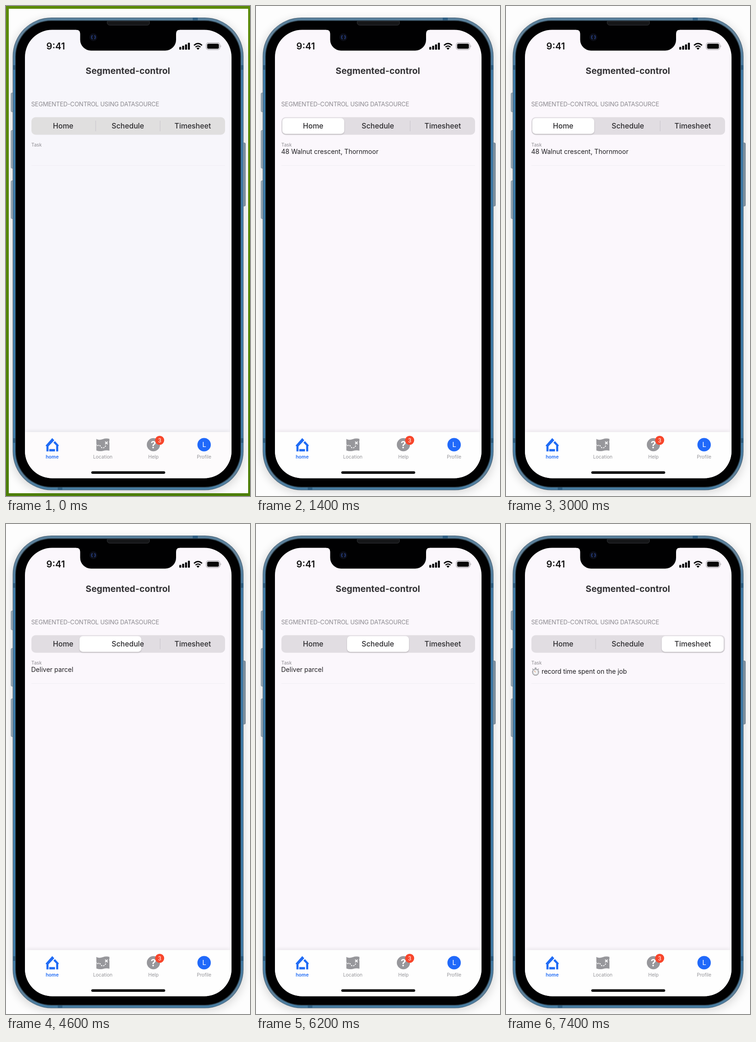
An HTML page that plays this animation: 528x1060 px, repeating every 8800 ms.

```html
<!DOCTYPE html>
<html lang="en">
<head>
<meta charset="utf-8">
<title>Segmented-control</title>
<style>
  html, body { margin: 0; width: 100%; height: 100%; overflow: hidden; background: #fdfdfd; }
  svg { display: block; width: 100vw; height: 100vh; font-family: Inter, Roboto, sans-serif;
        --screen: #fbf7fc; --track: #e1dde2; --bar: #fefefe; }
  svg.intro { --screen: #f7f6fb; --track: #e0dfdf; --bar: #fdfbfc; }
  #frame { display: none; }
  .intro #frame { display: block; }
  .mid { text-anchor: middle; }
  .seg { font-size: 15.7px; font-weight: 500; fill: #2b2a2d; }
  .tab { font-size: 10.3px; fill: #949498; }
  .task { font-size: 14px; fill: #1f1e21; }
</style>
</head>
<body>
<svg id="stage" viewBox="0 0 528 1060">
  <defs>
    <filter id="glow" x="-10%" y="-10%" width="120%" height="120%"><feGaussianBlur stdDeviation="10"/></filter>
    <filter id="soft" x="-10%" y="-40%" width="120%" height="180%"><feGaussianBlur stdDeviation="4"/></filter>
    <filter id="lift" x="-10%" y="-20%" width="120%" height="150%">
      <feDropShadow dx="0" dy="1.5" stdDeviation="1.3" flood-color="#000" flood-opacity=".22"/>
    </filter>
    <linearGradient id="green" x2="0" y2="1">
      <stop stop-color="#5b8b08"/><stop offset=".5" stop-color="#568705"/><stop offset="1" stop-color="#4c7e04"/>
    </linearGradient>
    <linearGradient id="rim" x2="0" y2="1">
      <stop stop-color="#58809c"/><stop offset=".04" stop-color="#66849a"/><stop offset=".12" stop-color="#3f7fae"/>
      <stop offset=".9" stop-color="#3f7fae"/><stop offset=".97" stop-color="#5d7f98"/><stop offset="1" stop-color="#447ca3"/>
    </linearGradient>
    <linearGradient id="key">
      <stop stop-color="#8195a5"/><stop offset=".4" stop-color="#a9bac7"/><stop offset="1" stop-color="#566a7a"/>
    </linearGradient>
    <clipPath id="display"><rect x="41" y="51.500" width="447" height="970" rx="59"/></clipPath>
  </defs>

  <rect width="528" height="1060" fill="#fdfdfd"/>
  <rect x="13" y="30" width="503" height="1022" rx="82" fill="#000" opacity=".15" filter="url(#glow)"/>
  <path id="frame" d="M0 0H528V1060H0ZM6 6V1054H524V6Z" fill="url(#green)" fill-rule="evenodd"/>

  <!-- phone body -->
  <g fill="url(#key)" stroke="#596b79" stroke-width=".7">
    <rect x="11" y="188" width="6" height="41" rx="2"/>
    <rect x="11" y="269" width="6" height="82" rx="2"/>
    <rect x="11" y="378" width="6" height="82" rx="2"/>
    <rect x="511" y="296" width="7" height="137" rx="2"/>
  </g>
  <rect x="14.5" y="25" width="499.5" height="1022.5" rx="84" fill="#526b7f"/>
  <rect x="16" y="26.3" width="496.5" height="1020" rx="82" fill="url(#rim)"/>
  <path d="M15 128h6v10h-6zM15 935h6v10h-6zM508 128h6v10h-6zM508 935h6v10h-6zM404 25h11v6h-11zM112 1041h10v6h-10z" fill="#2f5f83"/>
  <rect x="20" y="31" width="488.5" height="1010.5" rx="78" fill="#273742"/>
  <rect x="21.5" y="32.5" width="485.5" height="1007.5" rx="77" fill="#010102"/>
  <path d="M219 33H310.5V37Q310 41.5 305 41.5H225Q220 41.5 219 37Z" fill="#151618" stroke="#3b3d40" stroke-width=".8"/>

  <!-- display -->
  <g clip-path="url(#display)">
    <rect x="41" y="51" width="447" height="971" style="fill:var(--screen)"/>
    <rect x="44" y="920" width="441" height="20" fill="#000" opacity=".09" filter="url(#soft)"/>
    <rect x="41" y="921.5" width="447" height="101" style="fill:var(--bar)"/>
  </g>
  <path d="M152 50V51.5Q160.500 51.500 160.500 60V73A23.500 23.500 0 0 0 184 96.500H344.500A23.500 23.500 0 0 0 368 73V60Q368 51.500 376 51.500V50Z" fill="#010102"/>
  <circle cx="189" cy="67.5" r="8.5" fill="#0b0d16"/>
  <path d="M187 63.5q-4 4 0 8M191.500 63.500q4 4 0 8" fill="none" stroke="#243a78" stroke-width="2"/>

  <!-- status bar -->
  <text class="mid" x="107.5" y="94" font-size="20" font-weight="600" fill="#111">9:41</text>
  <g fill="#070707">
    <rect x="375" y="88.5" width="4.3" height="6" rx="1.2"/>
    <rect x="381.2" y="86" width="4.3" height="8.5" rx="1.2"/>
    <rect x="387.4" y="83" width="4.3" height="11.5" rx="1.2"/>
    <rect x="393.6" y="79.5" width="4.3" height="15" rx="1.2"/>
    <path d="M415.5 94.8l-3.3-3.4q3.3-2.6 6.600 0z"/>
    <rect x="435.3" y="81.5" width="25.4" height="11" rx="2.8"/>
  </g>
  <path d="M406.8 85.2q8.7-8 17.4 0M410.100 88.900q5.400-4.800 10.800 0" fill="none" stroke="#070707" stroke-width="2.6"/>
  <rect x="433.3" y="79.5" width="29.4" height="15" rx="4.5" fill="none" stroke="#99979b" stroke-width="1.1"/>
  <path d="M464.3 84.5q2.2 2.5 0 5z" fill="#99979b"/>

  <!-- page -->
  <text class="mid" x="263.7" y="146.5" font-size="19.2" font-weight="700" fill="#343336">Segmented-control</text>
  <text x="54.5" y="216.5" font-size="13" letter-spacing="-.24" fill="#8d8b90">SEGMENTED-CONTROL USING DATASOURCE</text>
  <rect x="55" y="240.5" width="419" height="38" rx="9" style="fill:var(--track)"/>
  <path id="leftRule" d="M194 248V271" stroke="#c8c4ca"/>
  <path id="rightRule" d="M333.5 248V271" stroke="#c8c4ca"/>
  <rect id="pill" y="242.5" width="134" height="34" rx="7.5" fill="#fff" filter="url(#lift)"/>
  <g class="seg mid">
    <text x="123.7" y="265">Home</text>
    <text x="263.7" y="265">Schedule</text>
    <text x="404" y="265">Timesheet</text>
  </g>
  <text x="54.8" y="303.7" font-size="10.2" fill="#8d8b90">Task</text>
  <text id="task" class="task" x="54.5" y="320"></text>
  <g id="timer">
    <g fill="none" stroke="#85858a" stroke-linecap="round">
      <circle cx="64" cy="320.5" r="6.8" fill="#f4f4f5" stroke-width="1.2"/>
      <path d="M64 313V311.5M62.500 311.300h3M58.500 314.500l-1-1M69.500 314.500l1-1" stroke-width="1.2"/>
      <circle cx="64" cy="320.5" r="5" stroke-dasharray=".6 2.018" stroke-width=".8"/>
    </g>
    <path d="M64 321l-2.5-3.5" stroke="#d0703c"/>
    <text class="task" x="77" y="324" letter-spacing="-.06">record time spent on the job</text>
  </g>
  <path d="M55 345H474" stroke="#f0edf3"/>

  <!-- tab bar -->
  <g fill="#1f6bf5">
    <path d="M86 950.5L100 934.8L104.500 939.500L92 952.500V963.500H87.500V952H86Z"/>
    <path d="M106 941.2L114 950V952H113V963.500H108.500V950.500L102.500 944.500Z"/>
    <path d="M93.5 958.5H106V963.500H93.500Z"/>
    <circle cx="428.7" cy="949" r="14.5" fill="#2069fa"/>
  </g>
  <path d="M195.5 936.5Q201 940 209.500 937Q217 934.500 223.800 936.500V941Q222.500 943 223.800 945V962Q217 960.500 209.500 962.500Q202 964 195.500 961.500V952Q197 949.500 195.500 947Z" fill="#97979b"/>
  <g fill="none" stroke="#fff" stroke-width="1.8">
    <path d="M214.5 942.5l5.5 5.5M220 942.500l-5.500 5.500"/>
    <path d="M197.5 951.5Q202 948.500 204.500 952.500T210 956T216 951" stroke-dasharray="3 2"/>
  </g>
  <circle cx="319" cy="949" r="14.3" fill="#97979b"/>
  <circle cx="332.5" cy="939.5" r="9.8" fill="#f8462b"/>
  <g class="mid" fill="#fff">
    <text x="319" y="956.5" font-size="21" font-weight="700">?</text>
    <text x="332.5" y="943.5" font-size="11.5">3</text>
    <text x="428.9" y="954.3" font-size="15">L</text>
  </g>
  <g class="tab mid">
    <text x="100" y="979" font-weight="600" style="fill:#1f6bf5">home</text>
    <text x="209.5" y="979">Location</text>
    <text x="319" y="979">Help</text>
    <text x="428.7" y="979">Profile</text>
  </g>
  <rect x="184.5" y="1006.5" width="160" height="5.5" rx="2.75" fill="#050505"/>
</svg>
<script>
  const LOOP = 8800;
  const el = id => document.getElementById(id);
  const show = (id, on) => el(id).style.visibility = on ? "visible" : "hidden";
  const ADDRESS = "48 Walnut crescent, Thornmoor", PARCEL = "Deliver parcel";

  // The picture advances in hard steps; rules are [left, right] visibility.
  const steps = [
    { at: 0, rules: [1, 1] },
    { at: 1400, x: 57, task: ADDRESS, rules: [0, 1] },
    { at: 4600, x: 159, task: PARCEL, rules: [0, 1] },
    { at: 4800, x: 197, task: PARCEL, rules: [0, 0] },
    { at: 6600, x: 285, timer: true, rules: [1, 0] },
    { at: 6800, x: 335, timer: true, rules: [1, 0] },
    { at: 7000, x: 337, timer: true, rules: [1, 0] }
  ];

  function draw(t) {
    const s = steps.filter(step => step.at <= t).pop();
    el("stage").classList.toggle("intro", t < 200);
    el("pill").setAttribute("x", s.x || 0);
    el("task").textContent = s.task || "";
    show("pill", s.x);
    show("timer", s.timer);
    show("leftRule", s.rules[0]);
    show("rightRule", s.rules[1]);
  }

  const start = performance.now();
  function tick() {
    draw((performance.now() - start) % LOOP);
    requestAnimationFrame(tick);
  }
  tick();
</script>
</body>
</html>
```
